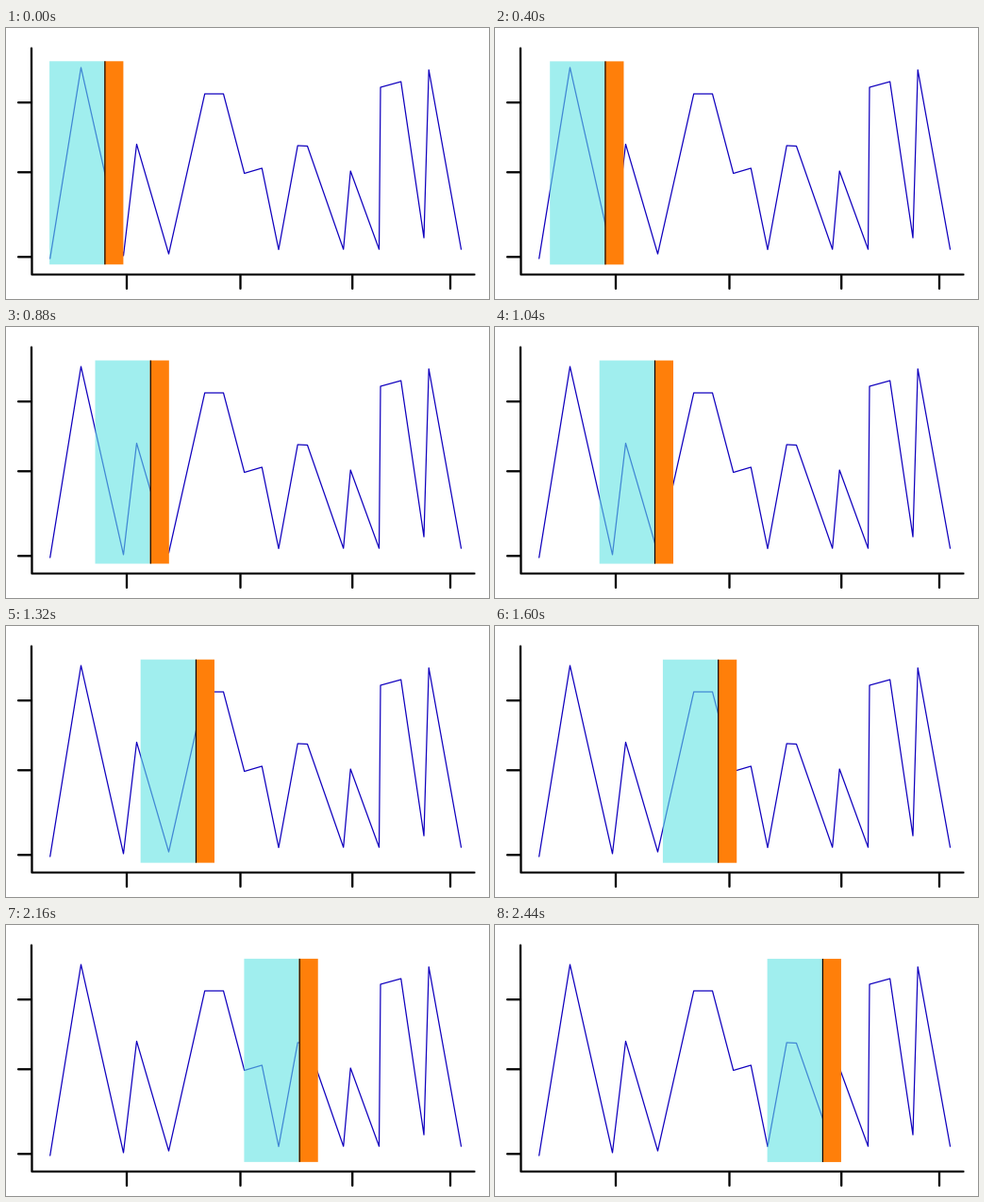
A matplotlib script for the animation above (2480 ms loop, 512 by 288 pixels).

```python
import matplotlib.pyplot as plt
from matplotlib.animation import FuncAnimation
from matplotlib.patches import Rectangle

W, H, DPI = 512, 288, 100
FRAMES, STEP = 62, 40
PX = 72 / DPI  # points per pixel

BLUE = (16 / 255, 0, 190 / 255)
CYAN = (97 / 255, 227 / 255, 227 / 255)
ORANGE = (1, 127 / 255, 10 / 255)

PAST, NEXT, EDGE = 58.2, 20.1, 1.15  # widths of the window's parts

fig = plt.figure(figsize=(W / DPI, H / DPI), dpi=DPI, facecolor="white")
ax = fig.add_axes([0, 0, 1, 1])
ax.set_xlim(0, W)
ax.set_ylim(H, 0)
ax.axis("off")


def stroke(points, color="black", width=2.3, z=1):
    ax.plot(*zip(*points), color=color, lw=width * PX, zorder=z, snap=False,
            solid_capstyle="round", solid_joinstyle="round")


def block(width, color, z, alpha=1):
    return ax.add_patch(Rectangle((0, 0), width, 216, fc=color, alpha=alpha,
                                  lw=0, zorder=z, snap=False))


def floor(x):
    """Level of the dips: rises slowly, then stays flat."""
    return max(235.2, 246.9 - 0.0395 * x)


def window_left(t):
    """Gentle start that settles into a steady glide."""
    return 46.1 + t * (5.5 + 66.3 * t - 11.4 * t * t)


# Axes and ticks
stroke([(27, 21.5), (27.5, 262), (496.5, 262)])
for y in (79.2, 153.3, 243.3):
    stroke([(13, y), (26.5, y)])
for x in (128, 248.5, 367.2, 471):
    stroke([(x, 262.5), (x, 277)])

# The curve returns to the floor between its peaks
dips = [(x, floor(x)) for x in (46.7, 124.5, 172.5, 289, 357.7, 395.5, 482.5)]
peaks = [(79.5, 42), (138.5, 123.5), (210.7, 70), (230.5, 70), (252.7, 154.5),
         (271.3, 149), (309.2, 125), (319.5, 125.5), (365.2, 152),
         (397, 63), (418.7, 57), (443, 223), (448.2, 44.5)]
stroke(sorted(dips + peaks), BLUE, 1.25, 2)

# Sliding window: each part with its offset from the left edge
parts = [
    (block(PAST, CYAN, 3, 0.6), 0),
    (block(NEXT, ORANGE, 4), PAST),
    (block(EDGE, "black", 5), PAST),
]


def update(i):
    t = i * STEP / 1000
    x, y = window_left(t), 35.3 + 0.25 * t
    for patch, offset in parts:
        patch.set_xy((x + offset, y))
    return [patch for patch, _ in parts]


anim = FuncAnimation(fig, update, frames=FRAMES, interval=STEP, repeat=True,
                     repeat_delay=0, blit=False)
plt.show()
```
